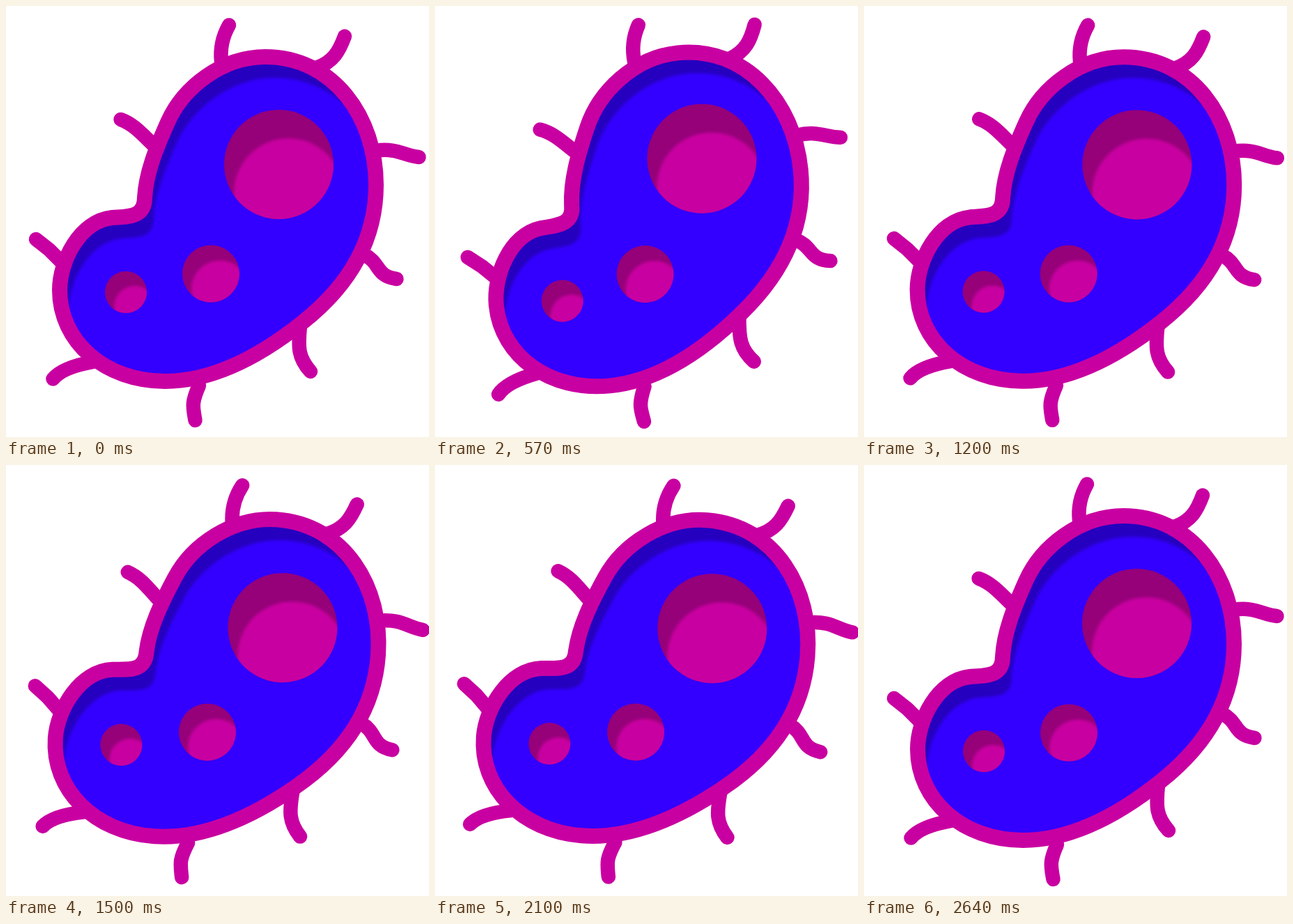
These frames come from a looping animation (607 px wide and 619 px high, 2.76 s). An HTML page with a canvas:

```html
<!DOCTYPE html>
<html lang="en">
<head>
<meta charset="utf-8">
<title>Rocking microbe</title>
<style>
  html, body { margin: 0; width: 100%; height: 100%; overflow: hidden; background: #fff; }
  canvas { display: block; width: 607px; height: 619px; }
</style>
</head>
<body>
<canvas width="607" height="619"></canvas>
<script>
const ctx = document.querySelector('canvas').getContext('2d');
const W = 607, H = 619, LOOP = 2760, STEP = 30;
const PINK = '#c900a1', DARK_PINK = '#960079', BLUE = '#3300ff', DARK_BLUE = '#2600bf';

// time in ms, angle in degrees
const swing = [
  [0, 0], [750, -7.5], [1200, 0.25], [1500, 3.9], [1650, 4.5], [1800, 4.75],
  [2000, 4.85], [2160, 4.4], [2250, 3.95], [2370, 2.94], [2640, 0], [LOOP, 0]
];

const body = new Path2D(`M372 73 C470 73 531 160 531 257 C531 335 494 400 426 454
  C366 502 297 539 228 539 C142 539 77 482 77 408 C77 366 106 309 152 304
  C176 302 199 304 199 275 C201 240 215 205 232 167 C254 117 310 73 372 73Z`);

const hairs = new Path2D(`M309 80 Q306 52 320 27.5 M445 89 C470 80 478 65 486 43.5
  M530 208 C560 203 572 215 592.5 217 M514 357 C538 369 530 388 560.5 392
  M422 460 C419 490 419 505 437 525 M277 545 C266 570 268 575 271.5 595
  M125 511 C97 516 77 524 67.5 535.5 M80 368 L62 350 43 335
  M212 200 C196 185 184 170 164.5 163`);

function disc(x, y, r) {
  const path = new Path2D();
  path.arc(x, y, r, 0, Math.PI * 2);
  return path;
}

// path, lit colour, shaded colour, shadow offset
const hollows = [
  [body, BLUE, DARK_BLUE, 13, 30],
  [disc(391.5, 227.5, 78.5), PINK, DARK_PINK, 14, 41],
  [disc(294, 384.5, 41), PINK, DARK_PINK, 13, 22],
  [disc(172, 411, 30), PINK, DARK_PINK, 13, 21]
];

function angleAt(t) {
  const i = swing.findIndex(k => k[0] > t);
  const [t0, a0] = swing[i - 1], [t1, a1] = swing[i];
  return a0 + (a1 - a0) * (t - t0) / (t1 - t0);
}

function pose(angle, dx = 0, dy = 0) {
  ctx.setTransform(1, 0, 0, 1, W / 2 + dx, H / 2 + dy);
  ctx.rotate(angle);
  ctx.translate(-W / 2, -H / 2);
}

// The light keeps its direction on screen while the shape turns.
function hollow(angle, [path, lit, shade, dx, dy]) {
  ctx.save();
  pose(angle);
  ctx.fillStyle = shade;
  ctx.fill(path);
  ctx.clip(path);
  pose(angle, dx, dy);
  ctx.filter = 'blur(2px)';
  ctx.fillStyle = lit;
  ctx.fill(path);
  ctx.restore();
}

function line(path, width) {
  ctx.lineWidth = width;
  ctx.stroke(path);
}

function draw(now) {
  const t = Math.floor((now % LOOP) / STEP) * STEP;
  const angle = angleAt(t) * Math.PI / 180;
  ctx.setTransform(1, 0, 0, 1, 0, 0);
  ctx.fillStyle = '#fff';
  ctx.fillRect(0, 0, W, H);
  pose(angle);
  ctx.strokeStyle = PINK;
  ctx.lineCap = ctx.lineJoin = 'round';
  line(hairs, 20.5);
  for (const h of hollows) hollow(angle, h);
  pose(angle);
  line(body, 22);
}

const start = performance.now();
function tick() {
  draw(performance.now() - start);
  requestAnimationFrame(tick);
}
tick();
</script>
</body>
</html>
```
